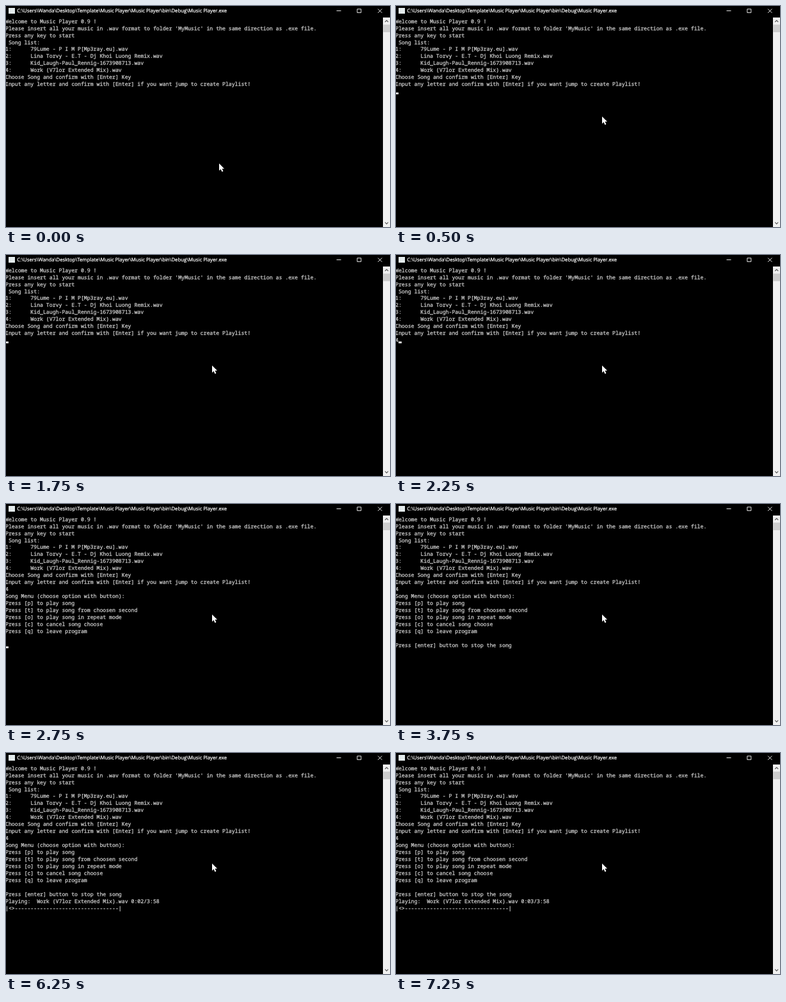
Recreate the animation shown at these times as an HTML page. Size 600x346 px, loop 8000 ms.

```html
<!DOCTYPE html>
<html lang="en">
<head>
<meta charset="utf-8">
<title>Music Player</title>
<style>
  html, body { margin: 0; width: 100%; height: 100%; overflow: hidden; background: #000; }
  svg { display: block; width: 600px; height: 346px; }
  text { white-space: pre; text-rendering: geometricPrecision; }
  .title { font: 7.75px "Open Sans", "Noto Sans", sans-serif; fill: #fff; stroke: #fff; stroke-width: .22; }
  #screen { font: 8.2px "Noto Sans Mono", "DejaVu Sans Mono", monospace; fill: #c8c8c8; stroke: #c8c8c8; stroke-width: .3; }
  .line { fill: none; stroke: #fff; stroke-width: .9; }
  .arrow { fill: none; stroke: #555; stroke-width: 1.1; }
</style>
</head>
<body>
<svg viewBox="0 0 600 346">
  <rect width="600" height="346"/>
  <rect x="4" y="3" width="10" height="9" fill="#e4ebec"/>
  <text class="title" x="17.3" y="10.3">C:\Users\Wanda\Desktop\Template\Music Player\Music Player\bin\Debug\Music Player.exe</text>
  <path class="line" d="M516.5 7.5h7M548.8 4.8h6v5.6h-6zM581.2 4.6l6.2 6.2M587.4 4.6l-6.2 6.2"/>

  <g id="screen"></g>
  <rect id="caret" width="4.9" height="2.8" fill="#f2f2f2"/>

  <rect x="589" y="18" width="11" height="328" fill="#f0f0f0"/>
  <rect x="589.4" y="29.2" width="10.6" height="11.8" fill="#cdcdcd"/>
  <path class="arrow" d="M592.2 25l2.5-2.5 2.5 2.5M592.2 338.7l2.5 2.5 2.5-2.5"/>

  <path id="pointer" fill="#fff" d="M0 0V11.2L2.6 8.8 4.4 13 6.4 12.2 4.6 8.1H8Z"/>
</svg>
<script>
const LOOP = 8000, COL = 4.92, ROW = 10.94, LEFT = -1, TOP = 18;
const tab = "      ";

// [time shown, row, text]
const lines = [
  [0, 0, "Welcome to Music Player 0.9 !"],
  [0, 1, "Please insert all your music in .wav format to folder 'MyMusic' in the same direction as .exe file."],
  [0, 2, "Press any key to start"],
  [0, 3, " Song list:"],
  [0, 4, "1:" + tab + "79Lume - P I M P[Mp3ray.eu].wav"],
  [0, 5, "2:" + tab + "Lina Torvy - E.T - Dj Khoi Luong Remix.wav"],
  [0, 6, "3:" + tab + "Kid_Laugh-Paul_Rennig-1673908713.wav"],
  [0, 7, "4:" + tab + "Work (V7lor Extended Mix).wav"],
  [0, 8, "Choose Song and confirm with [Enter] Key"],
  [0, 9, "Input any letter and confirm with [Enter] if you want jump to create Playlist!"],
  [2250, 10, "4"],
  [2750, 11, "Song Menu (choose option with button):"],
  [2750, 12, "Press [p] to play song"],
  [2750, 13, "Press [t] to play song from choosen second"],
  [2750, 14, "Press [o] to play song in repeat mode"],
  [2750, 15, "Press [c] to cancel song choose"],
  [2750, 16, "Press [q] to leave program"],
  [3750, 18, "Press [enter] button to stop the song"],
  [5250, 19, ""],
  [5250, 20, "|<>" + "-".repeat(33) + "|"]
];

// [time, column, row]; no cell means hidden
const caretSteps = [[0], [500, 0, 10], [1250], [1750, 0, 10], [2250, 1, 10], [2750, 0, 18], [3750]];
const pointerSteps = [[0, 333, 246.6], [250, 322, 173]];

const byId = id => document.getElementById(id);
const stepAt = (steps, t) => steps.filter(s => s[0] <= t).pop();
const screenBox = byId("screen"), caret = byId("caret"), pointer = byId("pointer");

const nodes = lines.map(([, row, str]) => {
  const el = document.createElementNS("http://www.w3.org/2000/svg", "text");
  el.setAttribute("x", LEFT);
  el.setAttribute("y", TOP + 8.7 + row * ROW);
  el.textContent = str;
  return screenBox.appendChild(el);
});
const playing = nodes[lines.findIndex(l => l[1] === 19)];

function draw(t) {
  nodes.forEach((el, i) => el.style.display = t >= lines[i][0] ? "" : "none");

  const sec = Math.max(1, 1 + Math.floor((t - 5250) / 1000));
  playing.textContent = `Playing:  Work (V7lor Extended Mix).wav 0:0${sec}/3:58`;

  const [, col, row] = stepAt(caretSteps, t);
  caret.style.display = row === undefined ? "none" : "";
  if (row !== undefined) {
    caret.setAttribute("x", LEFT + col * COL);
    caret.setAttribute("y", TOP + (row + 1) * ROW - 2.9);
  }

  const [, x, y] = stepAt(pointerSteps, t);
  pointer.setAttribute("transform", `translate(${x} ${y})`);
}

const start = performance.now();
function tick() {
  draw((performance.now() - start) % LOOP);
  requestAnimationFrame(tick);
}
tick();
</script>
</body>
</html>
```
